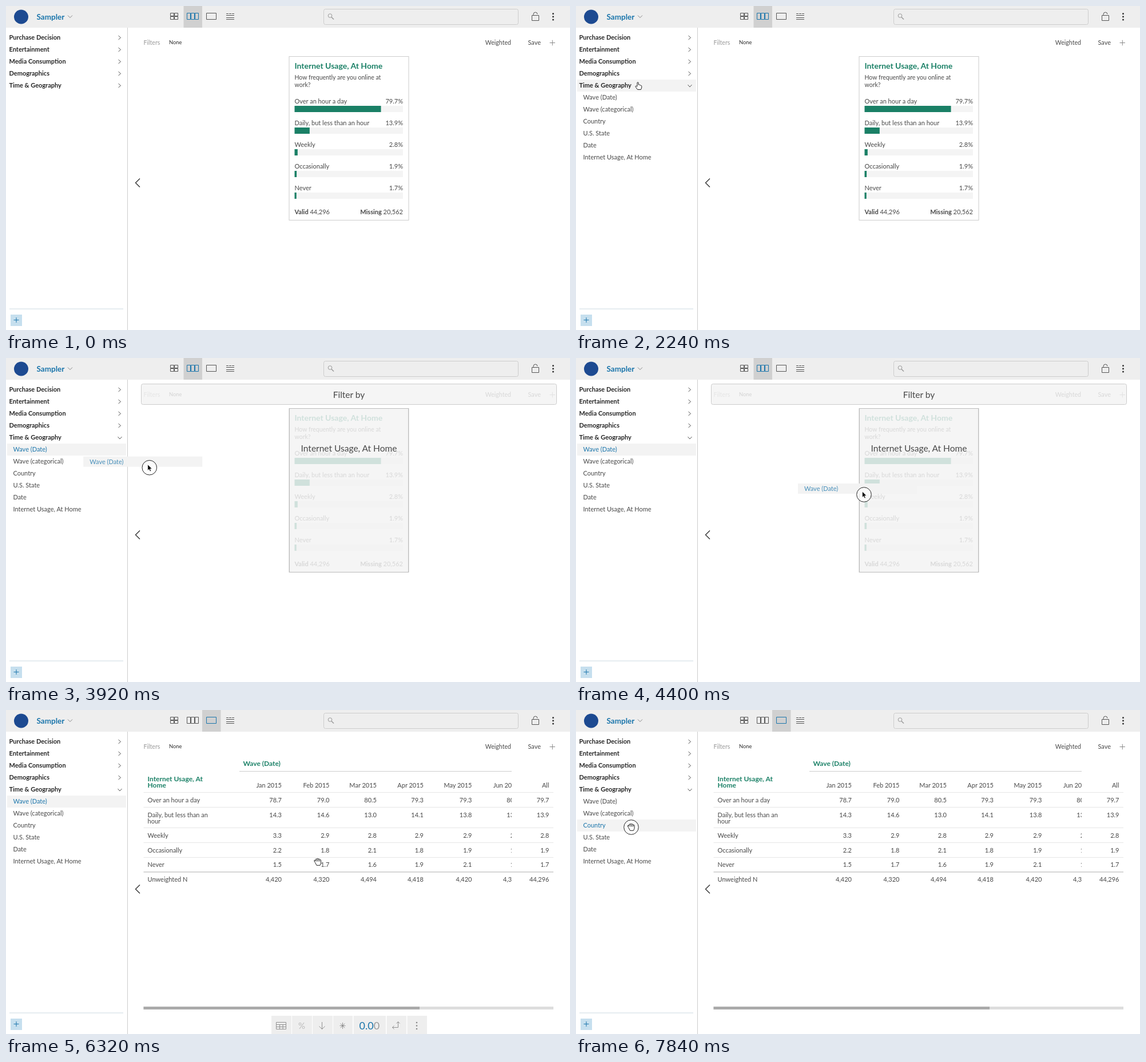
An HTML page for the animation above (8000 ms loop, 986 by 568 pixels).

```html
<!DOCTYPE html>
<html lang="en">
<head>
<meta charset="utf-8">
<title>Survey dashboard</title>
<style>
  html, body { margin: 0; width: 100%; height: 100%; overflow: hidden; background: #fff; }
  svg { display: block; width: 100%; height: 100%; font-family: Lato, "Open Sans", sans-serif; }
  text { fill: #484848; white-space: pre; }
  .bold { font-weight: 700; }
  .dark { fill: #262626; }
  .green { fill: #1a8066; }
  .blue { fill: #1a75ab; }
  .soft { fill: #999; }
  .line { fill: none; stroke: #555; stroke-width: 1; }
  .line.active { stroke: #1a75ab; }
</style>
</head>
<body>
<svg id="stage" viewBox="0 0 986 568"></svg>
<script>
const LOOP = 8000, STEP = 80;
const stage = document.getElementById('stage');

// ---- Markup helpers -------------------------------------------------------
// Text is placed by the vertical middle of its capitals.
const text = (x, y, str, size = 11, cls = '', anchor = 'start') =>
  `<text x="${x}" y="${y + size * 0.36}" font-size="${size}" class="${cls}" text-anchor="${anchor}">${str}</text>`;
const rect = (x, y, w, h, fill, extra = '') =>
  `<rect x="${x}" y="${y}" width="${w}" height="${h}" fill="${fill}" ${extra}/>`;
const path = (d, extra = '') => `<path class="line" d="${d}" ${extra}/>`;
const group = (id, body, extra = '') => `<g id="${id}" ${extra}>${body}</g>`;
const dots = (x, ys, r, fill) => ys.map(y => `<circle cx="${x}" cy="${y}" r="${r}" fill="${fill}"/>`).join('');
const box = (x, y, w, h) => `M${x} ${y}h${w}v${h}h${-w}z`;

// ---- Top bar --------------------------------------------------------------
const tabIcons = [
  [[287.5, 12.5], [294.5, 12.5], [287.5, 18.5], [294.5, 18.5]].map(([x, y]) => box(x, y, 6, 5)).join(''),
  [316.5, 323.5, 330.5].map(x => box(x, 12.5, 6, 11)).join(''),
  box(350.5, 12.5, 17, 11),
  'M385 13.5h4m1 0h4m1 0h4M385 16.5h14M385 20.5h14M385 23.5h14',
];

const topBar =
  rect(0, 0, 986, 38, '#eee') +
  rect(310.5, 0, 32.5, 38, '#d0d0d0', 'id="tabMark"') +
  '<circle cx="26.5" cy="19" r="12.5" fill="#1d4a91"/>' +
  text(53.5, 19, 'Sampler', 13.5, 'bold blue') +
  path('M108 16.5l4 4 4-4', 'style="stroke:#888"') +
  tabIcons.map((d, i) => path(d, `id="tab${i}"`)).join('') +
  rect(555.5, 5.5, 340, 27, '#eee', 'rx="3" stroke="#ccc"') +
  '<circle cx="566.5" cy="17" r="3.3" class="line" style="stroke:#999"/>' +
  path('M569 19.5l4 4', 'style="stroke:#999;stroke-width:1.4"') +
  path('M919.5 16.5h12v9h-12zM922 16.5v-2a3.5 3.5 0 0 1 7 0') +
  dots(956.5, [13.5, 18.8, 24], 1.5, '#333');

// ---- Sidebar --------------------------------------------------------------
const rowY = i => 55.5 + 21 * i;
const sections = ['Purchase Decision', 'Entertainment', 'Media Consumption', 'Demographics', 'Time &amp; Geography'];
const fields = ['Wave (Date)', 'Wave (categorical)', 'Country', 'U.S. State', 'Date', 'Internet Usage, At Home'];
const closedChevron = i => `M196.5 ${rowY(i) - 3.5}l4 3.5-4 3.5`;
const openChevron = 'M195.5 138l3.5 4 3.5-4';

const sidebar =
  path('M212.5 38V568', 'style="stroke:#ccc"') +
  rect(2, 0, 208, 21, '#f3f3f3', 'id="rowMark"') +
  sections.map((name, i) => text(5.5, rowY(i), name, 11, 'bold dark') +
    path(closedChevron(i), `id="chevron${i}"`)).join('') +
  `<clipPath id="listClip">${rect(0, 150, 212, 126, '#fff', 'id="listWindow"')}</clipPath>` +
  group('list', fields.map((name, i) => text(12.5, rowY(i + 5), name)).join(''), 'clip-path="url(#listClip)"') +
  path('M6 531H205', 'style="stroke:#ccdae2"') +
  rect(8, 541, 20, 20, '#c6dfee') +
  path('M13.5 550.5h9m-4.5-4.5v9', 'style="stroke:#1a75ab"');

// ---- Main panel -----------------------------------------------------------
const filterRow =
  text(240.5, 64, 'Filters', 10.6, 'soft') + text(285, 64, 'None', 9.3, 'dark') +
  text(883, 64, 'Weighted', 10.6, '', 'end') + text(935, 64, 'Save', 11, '', 'end') +
  path('M950.5 64.5h9.5m-4.75-4.75v9.5', 'style="stroke:#888"');

const answers = [
  ['Over an hour a day', 79.7], ['Daily, but less than an hour', 13.9],
  ['Weekly', 2.8], ['Occasionally', 1.9], ['Never', 1.7],
];

const card = group('card',
  rect(495, 88.5, 209, 287, '#fff', 'stroke="#ccc"') +
  text(504.5, 104.5, 'Internet Usage, At Home', 14, 'bold green') +
  text(504.5, 125.5, 'How frequently are you online at', 10.5) +
  text(504.5, 138.5, 'work?', 10.5) +
  answers.map(([label, share], i) => {
    const y = 167.5 + 38 * i;
    return text(504.5, y, label) + text(694, y, share + '%', 11, '', 'end') +
      rect(504.5, y + 7.5, 189.5, 11, '#f4f4f4') + rect(504.5, y + 7.5, 1.895 * share, 11, '#1a8066');
  }).join('') +
  text(504.5, 361, '<tspan class="bold">Valid</tspan> 44,296') +
  text(694, 361, '<tspan class="bold">Missing</tspan> 20,562', 11, '', 'end'));

const cardTools = group('cardTools',
  '<g fill="none" stroke="#aaa"><circle cx="690" cy="101.5" r="4.6"/>' +
  '<circle cx="690" cy="101.5" r="5.5" stroke-dasharray="2.2"/><circle cx="690" cy="101.5" r="1.9"/></g>' +
  text(494.5, 389, 'Properties') + text(704, 391.5, 'Save', 11, '', 'end'));

const dropZones = group('dropZones',
  rect(236.5, 45.5, 726, 36, '#f3f3f3', 'fill-opacity=".84" rx="3" stroke="#ccc"') +
  rect(495.5, 88.5, 208, 287, '#f3f3f3', 'fill-opacity=".84" stroke="#bbb"') +
  rect(495.5, 88.5, 208, 287, '#000', 'id="dropHover"') +
  text(599.5, 64, 'Filter by', 15.5, '', 'middle') +
  text(599.5, 158.5, 'Internet Usage, At Home', 15.5, '', 'middle'));

// ---- Table view -----------------------------------------------------------
const columns = [
  [482, 'Jan 2015', '78.7', '14.3', '3.3', '2.2', '1.5', '4,420'],
  [565.5, 'Feb 2015', '79.0', '14.6', '2.9', '1.8', '1.7', '4,320'],
  [648, 'Mar 2015', '80.5', '13.0', '2.8', '2.1', '1.6', '4,494'],
  [730, 'Apr 2015', '79.3', '14.1', '2.9', '1.8', '1.9', '4,418'],
  [814.5, 'May 2015', '79.3', '13.8', '2.9', '1.9', '2.1', '4,420'],
  [897, 'Jun 2015', '80.2', '13.1', '2.9', '1.8', '1.7', '4,384'],
  [949.5, 'All', '79.7', '13.9', '2.8', '1.9', '1.7', '44,296'],
];
const tableY = [132.5, 158, 184, 220.5, 246, 271.5, 297.5];
const labels = ['Over an hour a day', 'Daily, but less than an', 'Weekly', 'Occasionally', 'Never', 'Unweighted N'];
const column = ([x, ...cells]) => cells.map((cell, i) => text(x, tableY[i], cell, 11, '', 'end')).join('');

const table = group('table',
  `<clipPath id="scrollClip">${rect(408, 80, 476, 240, '#fff')}</clipPath>` +
  text(414.5, 94, 'Wave (Date)', 12, 'bold green') +
  path('M408 107.5H884', 'style="stroke:#ccc"') +
  text(247.5, 120.5, 'Internet Usage, At', 12, 'bold green') + text(247.5, 132, 'Home', 12, 'bold green') +
  labels.map((label, i) => text(247.5, tableY[i + 1], label)).join('') + text(247.5, 195, 'hour') +
  [144.5, 170.5, 206.5, 232.5, 258.5].map(y => path(`M240.5 ${y}H957`, 'style="stroke:#e6e6e6"')).join('') +
  path('M240.5 284H957', 'style="stroke:#c8c8c8;stroke-width:1.4"') +
  group('scrolled', columns.slice(0, 6).map(column).join(''), 'clip-path="url(#scrollClip)"') +
  column(columns[6]) +
  rect(240.5, 520, 716.5, 5, '#ddd') + rect(240.5, 520, 482.5, 5, '#aaa'));

const toolbar = group('toolbar',
  [[464, 35], [500, 35], [536, 35], [572, 34], [607.5, 56.5], [665.5, 34.5], [701.5, 34.5]]
    .map(([x, w]) => rect(x, 536, w, 32, '#eee')).join('') +
  group('toolIcons',
    path(box(472.5, 547.5, 17, 12) + 'M472.5 551.5h17m-17 4h17M478.5 551.5v8m5.5-8v8') +
    text(517, 553.5, '%', 15, 'soft', 'middle') +
    path('M552.5 547v12.5m-5-5l5 5 5-5') +
    path('M588.5 548v11m-5-5.5h10m-8.7-3.8l7.4 7.6m0-7.6l-7.4 7.6') +
    path('M675.5 556.5h10v-10m-7 7l-3 3 3 3m4-10l3-3 3 3'), 'opacity=".6"') +
  text(617.5, 554, '0.0<tspan class="soft">0</tspan>', 18, 'blue') +
  dots(718, [548, 553.5, 559], 1.3, '#888'));

// ---- Drag ghost and cursor ------------------------------------------------
const ghost = group('ghost',
  rect(0, 0, 208, 18, '#f3f3f3') + `<g opacity=".8">${text(11, 9.5, fields[0], 11, 'blue')}</g>`);

const shape = (id, d, fill, stroke, width = 1) =>
  `<path id="${id}" d="${d}" fill="${fill}" stroke="${stroke}" stroke-width="${width}" stroke-linejoin="round"/>`;
const cursor = group('cursor',
  '<circle id="ring" r="12.8" fill="#fff" fill-opacity=".6" stroke="#222"/>' +
  shape('arrow', 'M0 0V10.5L2.4 8.3 4 12 5.8 11.2 4.2 7.6H7.5Z', '#000', '#fff', 0.7) +
  shape('pointer', 'M-2 1V-5.2a1.1 1.1 0 0 1 2.2 0V-2q2-.6 2 .6 2-.4 2 .8 1.6-.2 1.6 1.2V3L4.5 6.5H-1.5L-5 1.5' +
    'q-.3-1.6 1.3-1.2Z', '#fff', '#222') +
  shape('hand', 'M-4.5 1L-6-1.5q-.8-1.5 .8-1.8L-3.8-1.5V-4.3a1.2 1.2 0 0 1 2.4 0V-5a1.2 1.2 0 0 1 2.4 0v.7' +
    'a1.2 1.2 0 0 1 2.4 0V-3a1.1 1.1 0 0 1 2.2 0V1.5Q5.5 3 4 5.8H-2ZM-1.4-4.3V-1M1-4.3V-1M3.4-3V-1', '#fff', '#222'));

stage.innerHTML = rect(0, 0, 986, 568, '#fff') + topBar + sidebar + filterRow + card + cardTools +
  table + toolbar + path('', 'id="collapse" style="stroke:#333;stroke-width:1.4"') + dropZones + ghost + cursor;

// ---- Timeline -------------------------------------------------------------
const el = id => document.getElementById(id);
const items = [...el('list').children];
const show = (id, on) => el(id).style.display = on ? '' : 'none';
const within = (t, from, to) => t >= from && t < to;
const progress = (t, from, to) => Math.min(1, Math.max(0, (t - from) / (to - from)));
const ease = p => p * p * (3 - 2 * p);
const valueAt = (keys, t) => keys.filter(k => k[0] <= t).pop()[1];

// Cursor hotspot: time, x, y
const trail = [
  [480, 638, 548], [800, 37, 185], [880, 37, 185], [1440, 109, 140], [2400, 109, 140],
  [2880, 105.5, 161.5], [3520, 105.5, 161.5], [3600, 110.5, 161], [4400, 500.5, 234],
  [4720, 545, 266.5], [6320, 545, 266.5], [7120, 30, 190], [7360, 96.5, 205.5], [LOOP, 96.5, 205.5],
];
const pointers = [[0, ''], [480, 'arrow'], [1280, 'pointer'], [3040, 'hand'], [3680, 'arrow'], [5600, 'hand']];
const highlights = [[0, -1], [1280, 4], [2640, 5], [6960, 7]];
const blueField = [[0, -1], [2640, 0], [5200, -1], [5600, 0], [6960, 2]];

function cursorAt(t) {
  const next = Math.max(1, trail.findIndex(k => k[0] > t));
  const [t0, x0, y0] = trail[next - 1], [t1, x1, y1] = trail[next];
  const p = ease(progress(t, t0, t1));
  return [x0 + (x1 - x0) * p, y0 + (y1 - y0) * p];
}

function draw(t) {
  const isTable = t >= 5600, tab = t >= 5280 ? 2 : 1;
  el('tabMark').setAttribute('x', tab === 2 ? 343 : 310.5);
  tabIcons.forEach((_, i) => el('tab' + i).classList.toggle('active', i === tab));

  el('listWindow').setAttribute('height', 126 * ease(progress(t, 1840, 2240)));
  el('chevron4').setAttribute('d', t < 1920 ? closedChevron(4) : openChevron);
  const row = valueAt(highlights, t), blue = valueAt(blueField, t);
  show('rowMark', row >= 0);
  el('rowMark').setAttribute('y', rowY(row) - 10.5);
  items.forEach((item, i) => item.classList.toggle('blue', i === blue));

  show('card', t < 5280);
  show('cardTools', within(t, 5200, 5280));
  show('table', isTable);
  show('toolbar', isTable);
  el('toolbar').style.opacity = 1 - progress(t, 6720, 7040);
  el('collapse').setAttribute('d', `M234 ${isTable ? 306.5 : 302.5}l-7.5 7.5 7.5 7.5`);

  const dragging = within(t, 3680, 5200);
  const [x, y] = cursorAt(t);
  show('dropZones', dragging);
  el('dropZones').style.opacity = progress(t, 3600, 3920);
  el('dropHover').style.opacity = 0.03 * progress(t, 4400, 4720);
  show('ghost', dragging);
  el('ghost').setAttribute('transform', `translate(${x - 112.5} ${y - 14})`);

  const kind = valueAt(pointers, t);
  ['arrow', 'pointer', 'hand'].forEach(id => show(id, id === kind));
  show('ring', within(t, 1840, 2160) || within(t, 3280, 5200) || t >= 7840);
  el('ring').setAttribute('transform', kind === 'arrow' ? 'translate(3 5.5)' : '');
  el('cursor').setAttribute('transform', `translate(${x} ${y})`);
}

const start = performance.now();
function tick() {
  const t = (performance.now() - start) % LOOP;
  draw(Math.floor(t / STEP) * STEP);
  requestAnimationFrame(tick);
}
tick();
</script>
</body>
</html>
```
